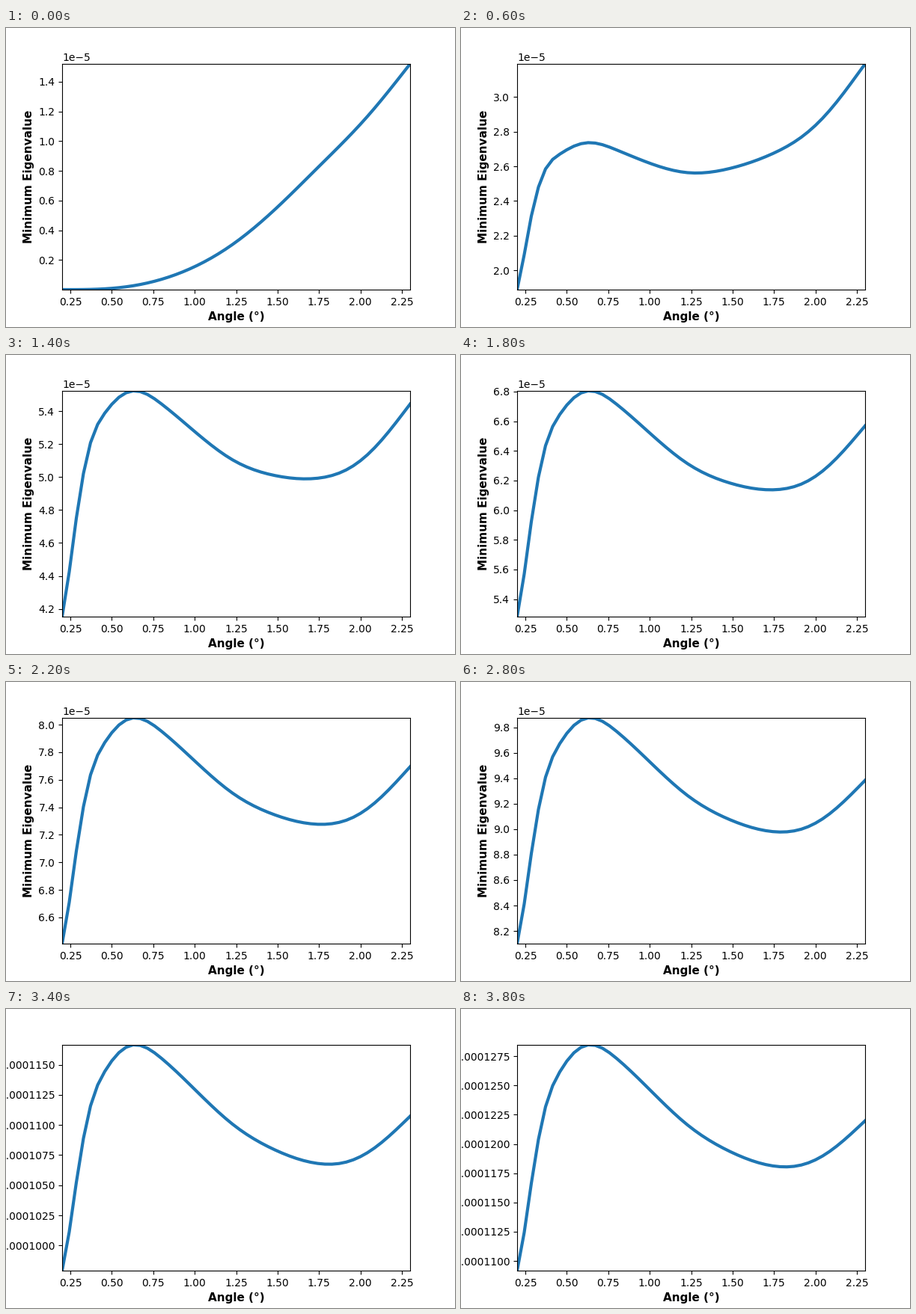
These frames come from a looping animation (600 px wide and 400 px high, 4 s). A matplotlib script:

```python
import numpy as np
import matplotlib.pyplot as plt
from matplotlib.animation import FuncAnimation

FRAMES, INTERVAL = 20, 200
N = 50
DRIFT = 0.563    # steady growth per step, in 1e-5
DECAY = 0.6      # how sharply the extra growth levels off

x = np.linspace(0.2005, 2.2995, N)
idx = np.arange(N)


def spline(points):
    """Natural cubic spline through (index, value) points, at every index."""
    xs, ys = np.array(points, float).T
    n, h = len(xs), np.diff(xs)
    slope = np.diff(ys) / h
    m, rhs = np.eye(n), np.zeros(n)
    for i in range(1, n - 1):
        m[i, i - 1:i + 2] = h[i - 1], 2 * (h[i - 1] + h[i]), h[i]
        rhs[i] = 6 * (slope[i] - slope[i - 1])
    c = np.linalg.solve(m, rhs)
    j = np.clip(np.searchsorted(xs, idx, side="right") - 1, 0, n - 2)
    d = idx - xs[j]
    b = slope[j] - h[j] * (2 * c[j] + c[j + 1]) / 6
    return ys[j] + d * (b + d * (c[j] / 2 + d * (c[j + 1] - c[j]) / (6 * h[j])))


# Curve at step 0, and the bump that grows on top of it
start = spline([(0, .001), (5, .004), (10, .027), (18, .141), (24, .305),
                (30, .542), (36, .822), (43, 1.167), (49, 1.52)])
bump = spline([(0, .231), (1, .63), (2, 1.185), (4, 2.156), (6, 2.667),
               (8, 2.956), (10, 3.07), (14, 2.858), (18, 2.416), (24, 1.656),
               (30, .966), (36, .39), (40, .14), (44, .02), (49, -.02)])

# Steps the bump needs to build up: fast at both ends of the angle range
pace = 0.12 + 3.2 * np.tanh(idx / 5.6) * (1 - (idx / (N - 1)) ** 3)


def curve(step):
    grown = 1 - (1 + step / pace) ** -DECAY
    return (start + DRIFT * step + bump * grown) * 1e-5


fig, ax = plt.subplots(figsize=(6, 4), dpi=100)
fig.subplots_adjust(left=0.125, right=0.9, bottom=0.125, top=0.88)
line, = ax.plot(x, curve(0), color="#1f77b4", lw=3)
ax.set_xlim(x[0], x[-1])
ax.set_xlabel("Angle (°)", fontsize=11, fontweight="bold")
ax.set_ylabel("Minimum Eigenvalue", fontsize=11, fontweight="bold")


def update(step):
    y = curve(step)
    line.set_ydata(y)
    ax.set_ylim(y.min(), y.max())
    return line,


anim = FuncAnimation(fig, update, frames=FRAMES, interval=INTERVAL,
                     repeat=True, repeat_delay=0, blit=False)
plt.show()
```
